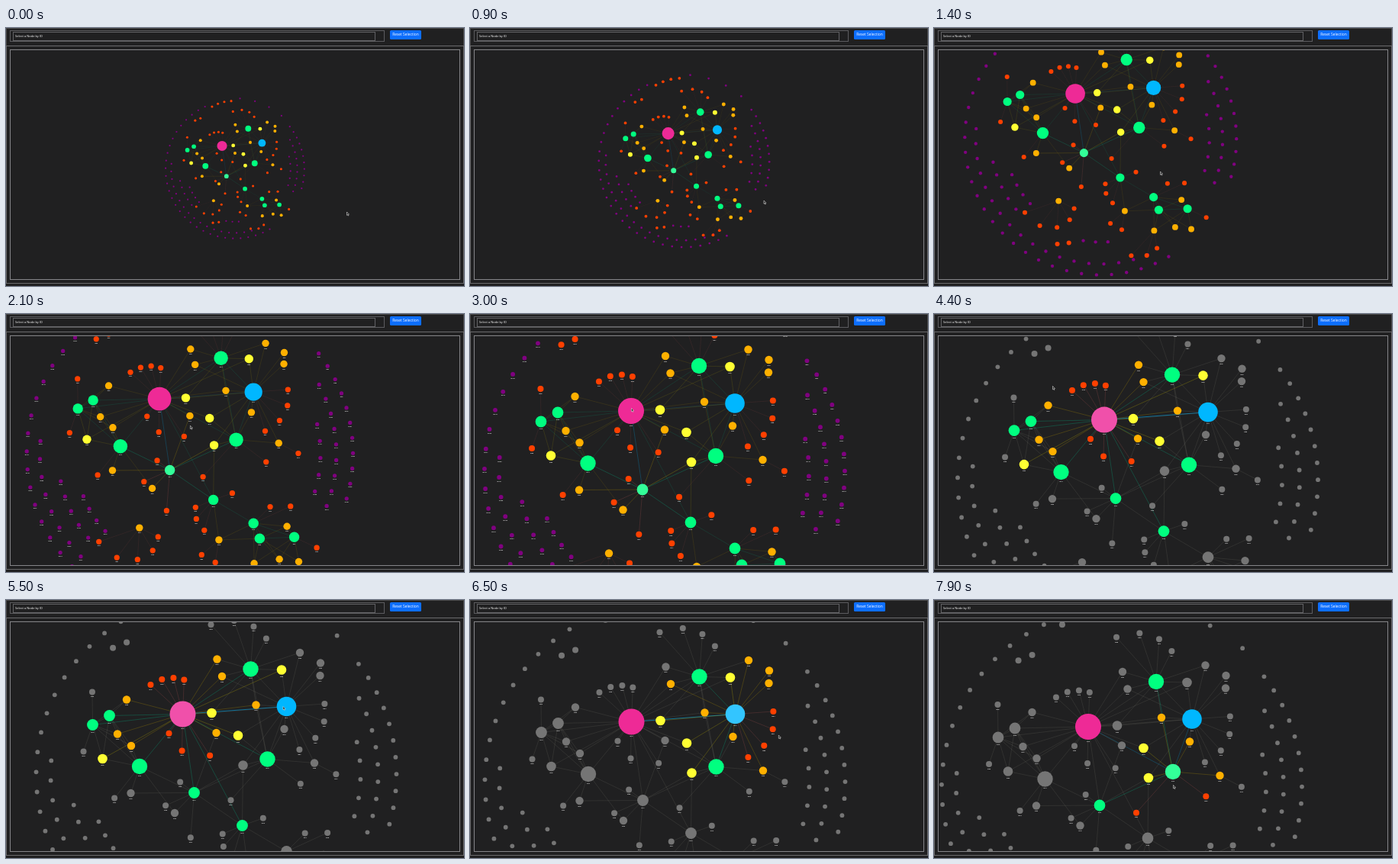
Recreate the animation shown at these times as an HTML page with a canvas. Size 600 px wide and 338 px high, loop 8000 ms.

```html
<!DOCTYPE html>
<html lang="en">
<head>
<meta charset="utf-8">
<title>Node graph</title>
<style>
  html, body { margin: 0; width: 100%; height: 100%; overflow: hidden; background: #202021; }
  #stage { position: relative; width: 600px; height: 338px; overflow: hidden; font-family: "Open Sans", "Noto Sans", sans-serif; }
  #stage > * { position: absolute; box-sizing: border-box; white-space: nowrap; }
  .bar { left: 0; top: 0; width: 600px; height: 24px; border: 1px solid #4a4a4b; }
  .field { left: 5px; top: 3px; width: 491px; height: 15px; border: 1px solid #5c5c5f; }
  .input { left: 9px; top: 5px; width: 475px; height: 12px; border: 1px solid #626265; padding-left: 2px; font-size: 4px; line-height: 10px; color: #fff; }
  .reset { left: 503px; top: 3px; width: 41px; height: 12px; border-radius: 1.5px; background: #0d6efd; color: #fff; font-size: 4.9px; line-height: 11.5px; text-align: center; }
  .panel { left: 0; top: 23px; width: 600px; height: 312px; border: 1px solid #6a6a6c; }
  .view { left: 5px; top: 28px; width: 590px; height: 302px; border: 1px solid #858588; }
  canvas { left: 0; top: 0; width: 600px; height: 338px; }
</style>
</head>
<body>
<div id="stage">
  <div class="bar"></div>
  <div class="field"></div>
  <div class="input">Select a Node by ID</div>
  <div class="reset">Reset Selection</div>
  <div class="panel"></div>
  <div class="view"></div>
  <canvas id="graph"></canvas>
</div>
<script>
const LOOP = 8000;
const GREY = '#757575';
const COLORS = { P: '#ee2a96', B: '#00b7ff', G: '#00ff80', Y: '#ffff33', O: '#ffb000', R: '#ff4000', V: '#800080' };
const PICKED = { P: '#f050aa', B: '#33c5ff', G: '#33ff99' };
const LINES = { P: '#00a0e0', B: '#00a0e0', G: '#00c090', Y: '#c8b800', O: '#b89800', R: '#a05050' };

const nodes = [], edges = [], byKey = {}, count = {};

function addNode(kind, r, x, y) {
  count[kind] = count[kind] ?? 0;
  const node = { kind, r, x, y, links: new Set(), label: 'N' + (nodes.length + 10) };
  byKey[kind + count[kind]++] = node;
  nodes.push(node);
  return node;
}

function addHubs(kind, r, ...points) {
  points.forEach(([x, y]) => addNode(kind, r, x, y));
}

function link(from, to) {
  edges.push({ from, to });
  from.links.add(to);
  to.links.add(from);
}

// Leaves around a hub; angle and distance grow by a fixed step.
function fan(key, n, dist, angle, turn = 0, grow = 0, linked = true) {
  const hub = byKey[key];
  for (let i = 0; i < n; i++) {
    const a = angle + i * turn, d = dist + i * grow;
    const leaf = addNode('R', 4, hub.x + d * Math.cos(a), hub.y + d * Math.sin(a));
    if (linked) link(hub, leaf);
  }
}

// Unconnected nodes on an arc about the middle of the graph.
function arc(radius, from, to, step) {
  for (let a = from; a <= to + .01; a += step) {
    addNode('V', 2.9, 255 + radius * Math.cos(a), 206 + radius * Math.sin(a));
  }
}

addHubs('P', 17, [211, 127]);
addHubs('B', 12.8, [347, 117]);
addHubs('G', 10.2, [300, 68], [322, 186], [154.5, 195.5]);
addHubs('G', 7.4, [115, 129], [93, 141], [226, 230], [289, 273], [347, 307], [356, 329], [406, 327]);
addHubs('Y', 6.3, [340.5, 69], [249, 125.5], [283.5, 155], [290, 194], [106, 185.5]);
addHubs('O', 5.2, [256, 55], [262.5, 77.5], [364.5, 46.5], [391.5, 60], [391, 76.5], [307, 115], [255, 151.5],
  [344, 146.5], [383.5, 191], [137.5, 108], [125.5, 153], [143.5, 168.5], [143, 230.5], [200.5, 256.5],
  [182, 313.5], [395.5, 311.5], [297, 331], [348, 365], [384.5, 359], [412.5, 362.5]);

fan('P0', 4, 57, -2.4, .29, -4);
fan('P0', 3, 65, .99, .6, -17);
fan('B0', 4, 50, -.07, .45, 3);
fan('G0', 4, 78, -2.3, .4, -11);
fan('G1', 2, 54, .64, 1.66, 18);
fan('G2', 1, 53, 2.24);
fan('G4', 2, 37, 1.9, 2.8, 6);
fan('G5', 3, 59, 1.65, 1.07, -18);
fan('G6', 3, 28, 2.74, -.44, 9);
fan('G6', 1, 29, -.34);
fan('G7', 2, 34, -.78, .35, 25);
fan('G9', 1, 36, .44);
fan('O8', 1, 32, .48);
fan('O14', 5, 30, .45, .59, 8);
fan('O16', 2, 33, 1.73, .7);
fan('O17', 3, 31, 1.41, .45, 14);
fan('P0', 4, 138, -1.82, .15, 6, false);
fan('O9', 2, 75, -1.57, -.26, -5, false);
fan('O14', 2, 75, 1.33, .27, 0, false);

// East side, then south to north-west, then the thin top
arc(236, -.66, .36, .094);
arc(212, -.49, .37, .107);
arc(189, -.226, .3, .13);
arc(236, 1.046, 4.27, .111);
arc(217, 1.185, 3.23, .12);
arc(191, 2.45, 2.93, .12);
arc(166, 2.4, 2.78, .12);
arc(179, 1.5, 1.75, .12);
arc(241, -1.5, -.8, .215);

// Main hubs have chosen partners; the other green hubs link to whatever is near.
const PARTNERS = {
  P0: 'B0 G0 G1 G2 G3 G4 G5 G6 Y0 Y1 Y2 Y4 O0 O1 O5 O6 O9 O10 O11',
  B0: 'G0 G1 Y0 Y1 Y2 Y3 O1 O2 O3 O4 O5 O7 O8',
  G1: 'G0 G5 Y2 Y3 O5 O7 O8'
};
for (const key in PARTNERS) PARTNERS[key].split(' ').forEach(other => link(byKey[key], byKey[other]));
const minor = nodes.filter(n => 'GYO'.includes(n.kind) && n !== byKey.G1);
for (const a of minor.filter(n => n.kind === 'G')) {
  for (const b of minor) {
    if (a !== b && !a.links.has(b) && Math.hypot(a.x - b.x, a.y - b.y) < 85) link(a, b);
  }
}
nodes.sort((a, b) => a.r - b.r);

// [time, scale, x, y]
const CAMERA = [
  [0, .385, 201.8, 105.6], [680, .385, 201.8, 105.6], [1400, .754, 26, -9.8], [1550, .754, 26, -9.8],
  [2400, 1, 0, 0], [3650, 1, 0, 0], [4400, 1, 12, 11.6], [5400, 1, 20.5, 22.5],
  [5640, 1, 20.5, 22.5], [6500, 1, .5, 32.5], [7200, 1, -9, 39], [LOOP, 1, -9, 39]];
// [time, x, y]
const POINTER = [
  [0, 446.5, 241], [60, 446.5, 241], [400, 421, 236], [700, 421, 236], [850, 385, 226], [1200, 385, 226],
  [1400, 296.5, 188], [1550, 296.5, 188], [2400, 211.5, 123.5], [3700, 211.5, 123.5], [4400, 155.5, 94.5],
  [4700, 155.5, 94.5], [5400, 354, 138], [5500, 363, 139.5], [5700, 363, 139.5], [6500, 404.5, 177],
  [7200, 306, 223], [7600, 306, 223], [7900, 313.5, 242.5], [LOOP, 313.5, 242.5]];
// [start, selected node, whether the rest is dimmed]
const SELECTION = [[0, 'G5', false], [3700, 'P0', true], [5700, 'B0', true], [7400, 'G1', true]];

const mix = (a, b, u) => a + (b - a) * u;

function span(keys, t) {
  const i = Math.max(1, keys.findIndex(k => k[0] > t));
  const a = keys[i - 1], b = keys[i];
  return [a, b, (t - a[0]) / (b[0] - a[0])];
}

// Zoom grows exponentially about a fixed point.
function cameraAt(t) {
  const [a, b, u] = span(CAMERA, t);
  const s = a[1] * (b[1] / a[1]) ** u;
  const w = a[1] === b[1] ? u : (s - a[1]) / (b[1] - a[1]);
  return { s, x: mix(a[2], b[2], w), y: mix(a[3], b[3], w) };
}

const canvas = document.getElementById('graph');
const ctx = canvas.getContext('2d');
const dpr = window.devicePixelRatio || 1;
canvas.width = 600 * dpr;
canvas.height = 338 * dpr;

function drawEdge({ from, to }, picked, dim) {
  const active = from === picked || to === picked;
  const other = to === picked ? from : to;
  const main = 'PB'.includes(from.kind) && 'PB'.includes(to.kind);
  ctx.strokeStyle = active ? LINES[other.kind] : dim ? '#9a9a90' : LINES[to.kind];
  ctx.globalAlpha = active ? (main ? .7 : .45) : .24;
  ctx.lineWidth = active && main ? .9 : .6;
  ctx.beginPath();
  ctx.moveTo(from.x, from.y);
  ctx.lineTo(to.x, to.y);
  ctx.stroke();
}

function drawNode(node, picked, dim, labels) {
  const faded = dim && node !== picked && !picked.links.has(node);
  ctx.fillStyle = faded ? GREY : node === picked ? PICKED[node.kind] : COLORS[node.kind];
  ctx.beginPath();
  ctx.arc(node.x, node.y, node.r, 0, 7);
  ctx.fill();
  if (labels && (!faded || node.links.size)) {
    ctx.fillStyle = '#eee';
    ctx.fillText(node.label, node.x, node.y + node.r + 2.2);
  }
}

function drawPointer(t) {
  const [a, b, u] = span(POINTER, t);
  ctx.save();
  ctx.translate(mix(a[1], b[1], u), mix(a[2], b[2], u));
  ctx.beginPath();
  [[0, 0], [0, 4.3], [1, 3.4], [1.7, 5], [2.4, 4.7], [1.7, 3.2], [3, 3.1]].forEach(p => ctx.lineTo(...p));
  ctx.closePath();
  ctx.fillStyle = '#111';
  ctx.fill();
  ctx.strokeStyle = '#ddd';
  ctx.lineWidth = .6;
  ctx.stroke();
  ctx.restore();
}

function draw(t) {
  const cam = cameraAt(t);
  const [, key, dim] = SELECTION.findLast(s => s[0] <= t);
  const picked = byKey[key];
  ctx.setTransform(dpr, 0, 0, dpr, 0, 0);
  ctx.clearRect(0, 0, 600, 338);
  ctx.save();
  ctx.beginPath();
  ctx.rect(6, 29, 588, 300);
  ctx.clip();
  ctx.translate(cam.x, cam.y);
  ctx.scale(cam.s, cam.s);
  ctx.font = 'bold 2.1px "Open Sans", "Noto Sans", sans-serif';
  ctx.textAlign = 'center';
  ctx.textBaseline = 'middle';
  edges.forEach(e => drawEdge(e, picked, dim));
  ctx.globalAlpha = 1;
  nodes.forEach(n => drawNode(n, picked, dim, cam.s > .85));
  ctx.restore();
  drawPointer(t);
}

function tick() {
  draw(performance.now() % LOOP);
  requestAnimationFrame(tick);
}
tick();
</script>
</body>
</html>
```
